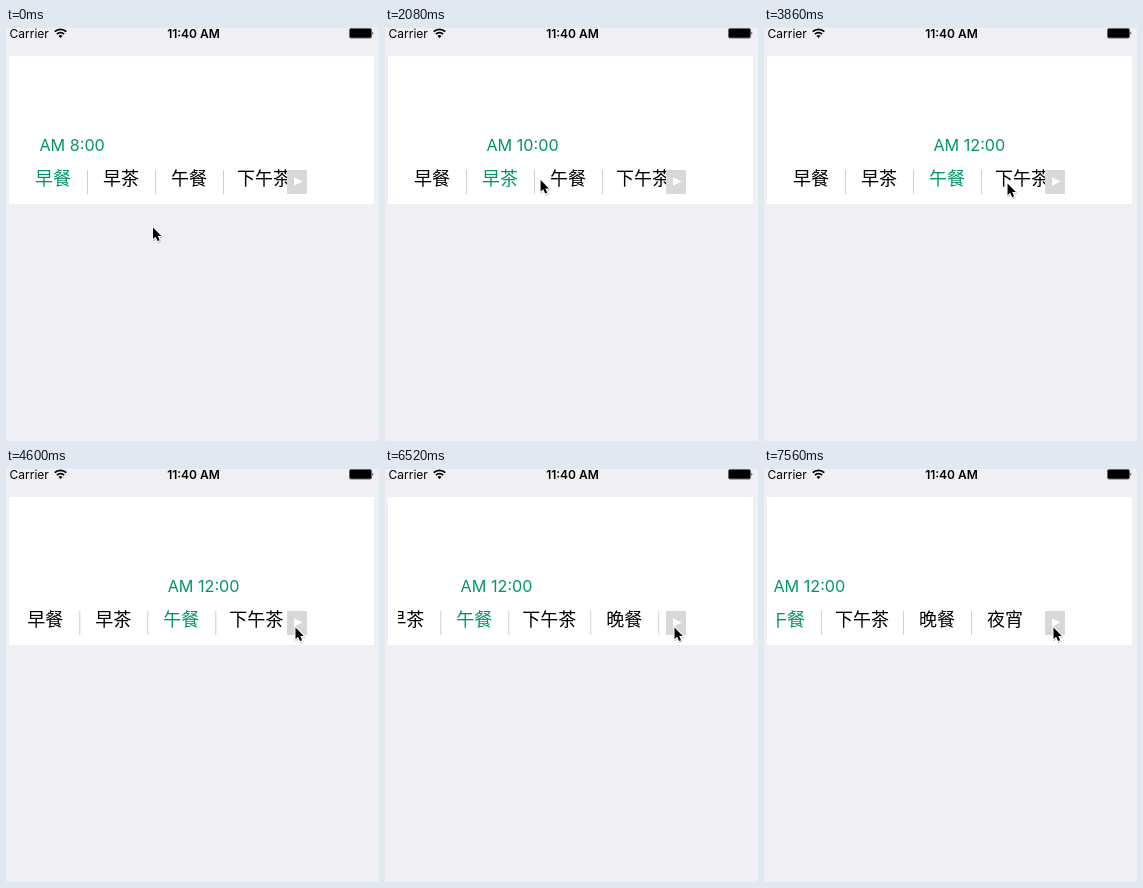
An HTML page for the animation above (8 s loop, 373 px wide and 413 px high).

```html
<!DOCTYPE html>
<html lang="zh">
<head>
<meta charset="utf-8">
<style>
  html, body { margin: 0; width: 100%; height: 100%; overflow: hidden; background: #efeff4; }
  svg { display: block; }
  text { font-family: Inter, Roboto, sans-serif; font-size: 12px; }
  #items text { font: 18px "Noto Sans CJK SC", "Noto Sans CJK", sans-serif; text-anchor: middle; }
  #time { font-size: 16.2px; fill: #009764; }
</style>
</head>
<body>
<svg width="373" height="413" viewBox="0 0 373 413">
  <clipPath id="strip"><rect x="13" y="130" width="268" height="46"/></clipPath>

  <text x="3.6" y="10">Carrier</text>
  <g fill="none" stroke="#000" stroke-width="1.7">
    <path d="M48.7 3.7a8.2 8.2 0 0 1 11.6 0M50.9 6.1a5.1 5.1 0 0 1 7.2 0"/>
    <path d="M54.5 10l-2-2.1a2.9 2.9 0 0 1 4 0z" fill="#000" stroke="none"/>
  </g>
  <text x="187.5" y="10" text-anchor="middle" font-weight="600">11:40 AM</text>
  <rect x="343.5" y=".5" width="22" height="9.5" rx="1.5" stroke="#666"/>
  <path d="M366.5 3.5q1.7 1.7 0 3.5z"/>

  <rect x="3" y="28" width="365" height="148" fill="#fff"/>
  <text id="time" y="123"></text>
  <g clip-path="url(#strip)"><g id="items"></g></g>
  <rect x="281" y="142" width="20" height="24" fill="#d8d8d8"/>
  <path d="M288 149.3l8.7 4.2-8.7 4.2z" fill="#fff"/>

  <g id="cursor" stroke-linejoin="round">
    <path id="arrow" d="M1 2v11.6l2.6-2.4 2 4.4 2-.9-1.9-4.3h3.6z" stroke="#fff" stroke-width="2" paint-order="stroke"/>
  </g>
</svg>
<script>
const LOOP = 8000, STEP = LOOP / 54;
const $ = id => document.getElementById(id);
const ease = u => (u = Math.min(1, Math.max(0, u)), u * u * (3 - 2 * u));

// Shadow under the pointer
const shadow = $('arrow').cloneNode();
shadow.setAttribute('transform', 'translate(.5 1)');
shadow.setAttribute('stroke', '#000');
shadow.setAttribute('opacity', .2);
$('cursor').prepend(shadow);

// Each cell is as wide as its text plus padding
const meals = ['早餐', '早茶', '午餐', '下午茶', '晚餐', '夜宵'];
let left = 13;
$('items').innerHTML = meals.map((name, i) => {
  const width = 36 + name.length * 16 - (name.length > 2 ? 2 : 0);
  const x = left + width / 2;
  left += width;
  return `<text x="${x}" y="157.3">${name}</text>` +
    (i < meals.length - 1 ? `<rect x="${left}" y="142" width="1" height="24" fill="#d0d0d0"/>` : '');
}).join('');
const names = $('items').querySelectorAll('text');

const picks = [9, 21].map(n => n * STEP);
const presses = [4508, 5630, 6400, 7183];
// Pointer moves: start, end, target x and y
const moves = [[0, 889, 113, 150], [1630, 2450, 187, 150], [3400, 4250, 288.5, 156.5]];

function pointer(t) {
  let x = 146, y = 197.5;
  for (const [from, to, tx, ty] of moves) {
    const k = ease((t - from) / (to - from));
    x += (tx - x) * k;
    y += (ty - y) * k;
  }
  return [x, y];
}

const slide = (starts, t, distance) =>
  starts.reduce((sum, at) => sum + distance * ease((t - at) / 300), 0);

function draw(now) {
  // The screen refreshes in even steps
  const t = Math.floor((now % LOOP + 5) / STEP) % 54 * STEP;
  const chosen = picks.filter(p => t >= p).length;
  const scroll = slide(presses, t, 40);

  names.forEach((el, i) => el.setAttribute('fill', i === chosen ? '#009764' : '#000'));
  $('items').setAttribute('transform', `translate(${-scroll})`);
  $('time').textContent = `AM ${8 + 2 * chosen}:00`;
  $('time').setAttribute('x', 33.4 + slide(picks, t, 68) - scroll);
  $('cursor').setAttribute('transform', `translate(${pointer(t)})`);
}

const start = performance.now();
function tick() {
  draw(performance.now() - start);
  requestAnimationFrame(tick);
}
tick();
</script>
</body>
</html>
```
